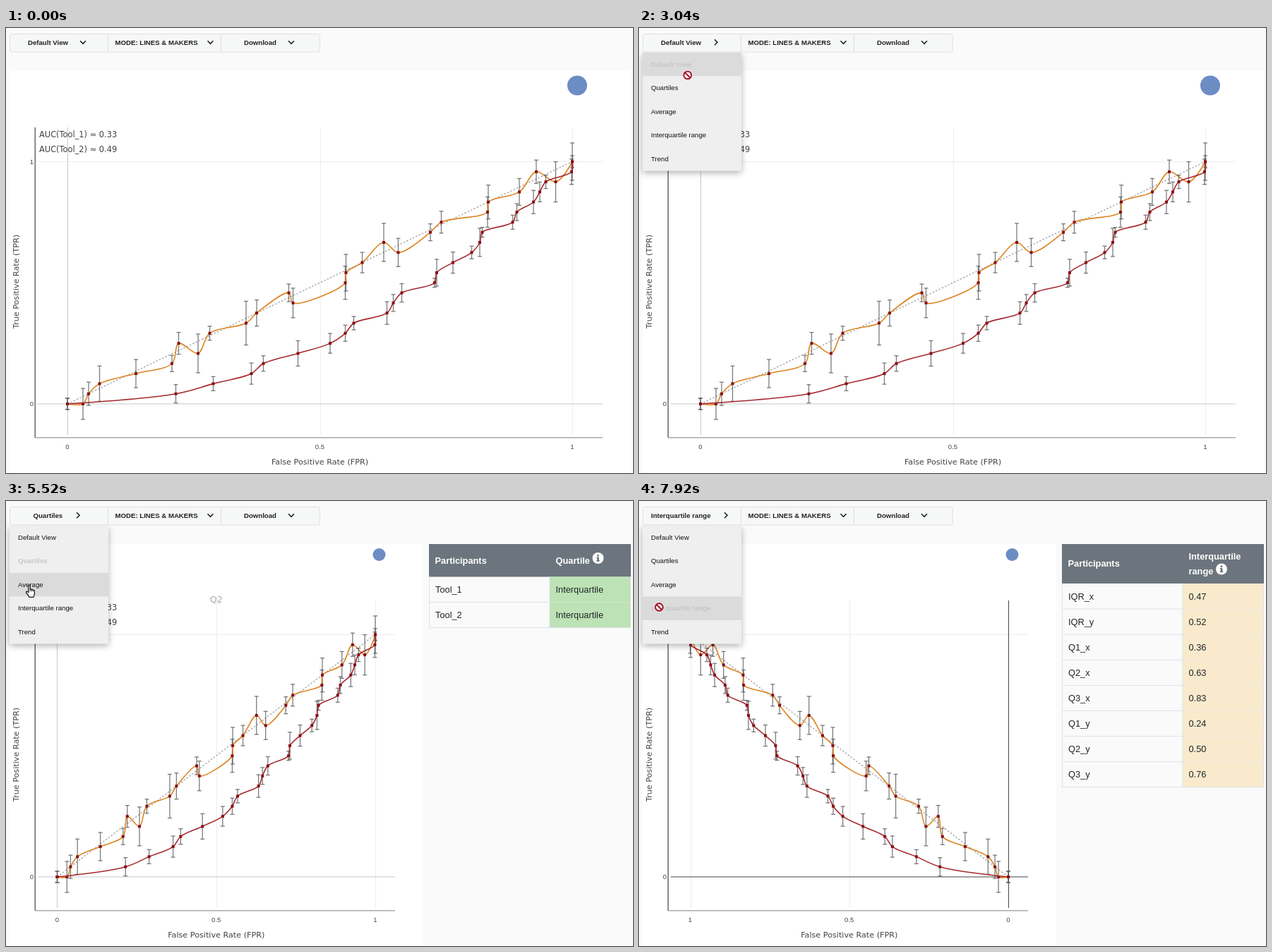
An HTML page with a canvas for the animation above (8 s loop, 888x631 px).

```html
<!DOCTYPE html>
<html lang="en">
<head>
<meta charset="utf-8">
<title>ROC benchmark view</title>
<style>
html, body { margin: 0; width: 100%; height: 100%; overflow: hidden; background: #fafafa; }
canvas { display: block; }
</style>
</head>
<body>
<canvas id="stage" width="888" height="631"></canvas>
<script>
const ctx = document.getElementById('stage').getContext('2d');
const LOOP = 8000;
const SANS = '"Liberation Sans", Arial, sans-serif';
const WIDE = '"DejaVu Sans", Verdana, sans-serif';

const TOP = 34.6, ROW = 33.6;
const VIEWS = ['Default View', 'Quartiles', 'Average', 'Interquartile range', 'Trend'];
const BUTTON = [[31, 109], [38.5, 102], [41, 99.5], [17, 123]]; // label x, chevron x
const PICKS = [4000, 5600, 7280];
const MENU_AT = 2400;

// x is measured on the wide chart (0 at 87, 1 at 802); levels are in 24ths
const ORANGE = {
  color: '#dc8420',
  x: [87, 109, 117, 132.5, 184, 235, 244.5, 272, 288.5, 340, 355, 400.5, 406.5, 480.5,
    481.5, 504.5, 535, 555.5, 601, 616.5, 682, 683, 727, 751, 778.5, 802],
  level: [0, 0, 1, 2, 3, 4, 6, 5, 7, 8, 9, 11, 10, 12, 13, 14, 16, 15, 17, 18, 19, 20, 21, 23, 22, 24],
  err: [8, 22, 16.5, 25, 20, 11.5, 15.5, 27.5, 10, 31, 18.5, 12.5, 21, 23.5, 26, 14.5, 27,
    20, 12, 15.5, 21.5, 24, 19, 16.5, 28.5, 26.5]
};
const RED = {
  color: '#a62a30',
  x: [87, 240.5, 293.5, 347.5, 364.5, 413.5, 459, 480.5, 492.5, 539.5, 548.5, 560.5, 607,
    610, 633, 659.5, 671, 674.5, 717.5, 723.5, 747, 756, 764.5, 801, 802],
  err: [8, 13, 10, 15, 11, 18, 14, 11.5, 9.5, 16, 12, 13, 6.5, 19, 15, 9, 20, 7, 10, 12,
    16.5, 14, 9.5, 18, 8.5]
};
RED.level = RED.x.map((_, i) => i);

// time, x, y of the pointer hotspot
const PATH = [[2000, 135, 33], [2300, 128.5, 22], [2640, 128.5, 22], [3280, 41.5, 87.5],
  [4640, 41.5, 87.5], [5040, 33, 119], [5540, 33, 119], [5800, 29.5, 129.5],
  [6760, 29.5, 129.5], [7080, 28.5, 150.5], [LOOP, 28.5, 150.5]];

const HAND = new Path2D('M4 11.5V1.9Q4 .6 5.2 .6T6.4 1.9V7Q7.6 5.9 8.6 7.4Q10 6.5 10.8 8' +
  'Q12.6 7.6 12.6 9.5V13Q12.4 15.5 11 18H5.2Q3.5 14.5 .8 11.6Q.3 9.6 2 9.8Q3 10.2 4 11.5Z');
const KNUCKLES = new Path2D('M6.4 7V10M8.6 7.4V10M10.8 8V10');

const clamp = v => Math.max(0, Math.min(1, v));
const ease = v => v * v * (3 - 2 * v);
const yOf = v => 533 - 343.5 * v;

function rect(x, y, w, h, fill) {
  ctx.fillStyle = fill;
  ctx.fillRect(x, y, w, h);
}

function line(x1, y1, x2, y2, color, width = 1) {
  ctx.strokeStyle = color;
  ctx.lineWidth = width;
  ctx.beginPath();
  ctx.moveTo(x1, y1);
  ctx.lineTo(x2, y2);
  ctx.stroke();
}

function disc(x, y, r, fill) {
  ctx.fillStyle = fill;
  ctx.beginPath();
  ctx.arc(x, y, r, 0, 2 * Math.PI);
  ctx.fill();
}

// y is the middle of the capitals
function text(str, x, y, size, { font = SANS, weight = '', color = '#444', align = 'left' } = {}) {
  ctx.font = `${weight} ${size}px ${font}`;
  ctx.fillStyle = color;
  ctx.textAlign = align;
  ctx.fillText(str, x, y + size * 0.36);
}

// centripetal Catmull-Rom handles before and after point b
function handles(a, b, c) {
  const d1 = [a[0] - b[0], a[1] - b[1]], d2 = [c[0] - b[0], c[1] - b[1]];
  const l1 = Math.sqrt(Math.hypot(...d1)), l2 = Math.sqrt(Math.hypot(...d2));
  const n = [0, 1].map(k => l2 * l2 * d1[k] - l1 * l1 * d2[k]);
  const m1 = 3 * l2 * (l1 + l2), m2 = 3 * l1 * (l1 + l2);
  return [n.map((v, k) => b[k] + v / m1), n.map((v, k) => b[k] - v / m2)];
}

function spline(pts, color) {
  const last = pts.length - 1;
  const h = pts.map((p, i) => i && i < last ? handles(pts[i - 1], p, pts[i + 1]) : null);
  ctx.beginPath();
  ctx.moveTo(...pts[0]);
  ctx.quadraticCurveTo(...h[1][0], ...pts[1]);
  for (let i = 2; i < last; i++) ctx.bezierCurveTo(...h[i - 1][1], ...h[i][0], ...pts[i]);
  ctx.quadraticCurveTo(...h[last - 1][1], ...pts[last]);
  ctx.strokeStyle = color;
  ctx.lineWidth = 1.6;
  ctx.stroke();
}

function series(s, xOf) {
  const pts = s.x.map((x, i) => [xOf((x - 87) / 715), yOf(s.level[i] / 24)]);
  pts.forEach(([x, y], i) => {
    const e = s.err[i], c = 'rgba(80,80,80,.75)';
    line(x, y - e, x, y + e, c, 1.3);
    line(x - 3, y - e, x + 3, y - e, c, 1.3);
    line(x - 3, y + e, x + 3, y + e, c, 1.3);
  });
  spline(pts, s.color);
  for (const [x, y] of pts) rect(x - 2, y - 2, 4, 4, '#8a1014');
}

function chart(view) {
  const wide = view === 0, flipped = view > 1;
  const right = wide ? 845 : 551;
  const x0 = wide ? 87 : 72.5, span = wide ? 715 : 450.5;
  const xOf = v => x0 + span * (flipped ? 1 - v : v);
  const mid = xOf(0.5), zero = flipped ? '#444' : '#c8c8c8';

  rect(5, 61, wide ? 880 : 586, 570, '#fff');
  if (wide) disc(809, 81.5, 14, '#6c8cc4');
  else disc(528.5, 76, 9, '#6c8cc4');

  for (const v of [0.5, 1]) line(Math.round(xOf(v)) + .5, 141, Math.round(xOf(v)) + .5, 577, '#eee');
  line(45, 189.5, right, 189.5, '#eee');
  line(Math.floor(xOf(0)) + .5, 141, Math.floor(xOf(0)) + .5, 577, zero);
  line(45, 533, right, 533, zero, 1.2);
  line(41.2, 141, 41.2, 581, '#444', 1.2);
  line(41, 580.8, right, 580.8, '#999', 1.2);

  ctx.setLineDash([2.4, 2.4]);
  line(xOf(0), yOf(0), xOf(1), yOf(1), '#aaa', 1.5);
  ctx.setLineDash([]);
  series(ORANGE, xOf);
  series(RED, xOf);

  for (const v of [0, 0.5, 1]) text(String(v), xOf(v), 593.5, 9.6, { align: 'center' });
  text('1', 39, 189.5, 9.6, { align: 'right' });
  text('0', 39, 533, 9.6, { align: 'right' });
  text('False Positive Rate (FPR)', mid, 615, 11.2, { font: WIDE, align: 'center' });
  ctx.save();
  ctx.translate(13.5, 359.5);
  ctx.rotate(-Math.PI / 2);
  text('True Positive Rate (TPR)', 0, 0, 11.2, { font: WIDE, align: 'center' });
  ctx.restore();
  if (!flipped) {
    text('AUC(Tool_1) ≈ 0.33', 47, 150.5, 11.4, { font: WIDE });
    text('AUC(Tool_2) ≈ 0.49', 47, 172, 11.4, { font: WIDE });
  }
  if (view === 1) text('Q2', mid, 139, 12.8, { font: WIDE, color: '#a4adb6', align: 'center' });
}

function table(view) {
  const tall = view === 3;
  const headEnd = tall ? 117 : 107.5;
  const rowH = view === 2 ? 55.5 : 36.1;
  const names = tall ? ['IQR_x', 'IQR_y', 'Q1_x', 'Q2_x', 'Q3_x', 'Q1_y', 'Q2_y', 'Q3_y'] : ['Tool_1', 'Tool_2'];
  const values = ['0.47', '0.52', '0.36', '0.63', '0.83', '0.24', '0.50', '0.76'];
  const head = [null, ['Quartile'], ['Average'], ['Interquartile', 'range']][view];
  const icon = [null, [838.5, 81], [840, 81], [825, 96.5]][view];
  const bold = { weight: 'bold', color: '#fff' }, body = { color: '#212529' };

  rect(599, 61, 286, headEnd - 61, '#6c757d');
  text('Participants', 607.5, tall ? 88.5 : 84, 12.8, bold);
  head.forEach((h, i) => text(h, 778.5, (tall ? 78 : 84.5) + i * 21.5, 12.8, bold));
  disc(...icon, 8, '#fff');
  rect(icon[0] - 1.2, icon[1] - 4.8, 2.4, 2.3, '#5c646c');
  rect(icon[0] - 1.2, icon[1] - 1.3, 2.4, 5.8, '#5c646c');
  rect(icon[0] - 2.2, icon[1] - 1.3, 2, 1.3, '#5c646c');
  rect(icon[0] - 2.2, icon[1] + 3.2, 4.4, 1.3, '#5c646c');

  names.forEach((name, i) => {
    const y = headEnd + i * rowH, c = y + rowH / 2;
    rect(770, y, 115, rowH, view === 1 ? '#bde2b5' : '#f9eacd');
    text(name, 608, c, 12.8, body);
    if (view === 2) {
      text('Medium', 778.5, c - 9.8, 12.8, body);
      text('performance', 778.5, c + 9.5, 12.8, body);
    } else {
      text(tall ? values[i] : 'Interquartile', 778.5, c, 12.8, body);
    }
    line(599, y + rowH, 885, y + rowH, '#dee2e6');
  });
  const end = headEnd + rowH * names.length;
  for (const x of [599.5, 770, 884.5]) line(x, headEnd, x, end, '#dee2e6');
}

function chevron(x, turn) {
  ctx.save();
  ctx.translate(x, 20.3);
  ctx.rotate(-turn * Math.PI / 2);
  ctx.strokeStyle = '#222';
  ctx.lineWidth = 1.6;
  ctx.beginPath();
  ctx.moveTo(-4, -2);
  ctx.lineTo(0, 2);
  ctx.lineTo(4, -2);
  ctx.stroke();
  ctx.restore();
}

function toolbar(view, turn) {
  ctx.beginPath();
  ctx.roundRect(5.5, 8.5, 439, 25.5, 3);
  ctx.fillStyle = '#f6f7f7';
  ctx.fill();
  ctx.strokeStyle = '#dfe1e4';
  ctx.lineWidth = 1;
  ctx.stroke();
  line(144.5, 9, 144.5, 34, '#dcdee8');
  line(304.5, 9, 304.5, 34, '#dcdee8');
  const [labelX, chevX] = BUTTON[view];
  const style = { weight: 'bold', color: '#222' };
  text(VIEWS[view], labelX, 20.5, 9.65, style);
  text('MODE: LINES & MAKERS', 154.5, 20.5, 9.65, style);
  text('Download', 337, 20.5, 9.65, style);
  chevron(chevX, turn);
  chevron(289.5, 0);
  chevron(404, 0);
}

function menu(view, hover, open) {
  ctx.save();
  ctx.globalAlpha = open;
  ctx.save();
  ctx.shadowColor = 'rgba(0,0,0,.3)';
  ctx.shadowBlur = 9;
  ctx.shadowOffsetY = 3;
  rect(5, TOP, 140, ROW * 5, '#efefef');
  ctx.restore();
  if (hover >= 0) rect(5, TOP + hover * ROW, 140, ROW, '#dbdbdb');
  VIEWS.forEach((name, i) => {
    const off = i === view;
    text(name, 17, TOP + (i + .5) * ROW - .3, 9.65, { weight: off ? 'bold' : '', color: off ? '#c6c6c6' : '#111' });
  });
  ctx.restore();
}

function pointerAt(t) {
  if (t < PATH[0][0]) return null;
  const i = PATH.findIndex(p => p[0] > t);
  const [t0, x0, y0] = PATH[i - 1], [t1, x1, y1] = PATH[i];
  const k = ease((t - t0) / (t1 - t0));
  return [x0 + (x1 - x0) * k, y0 + (y1 - y0) * k];
}

function pointer([x, y], blocked) {
  if (blocked) {
    disc(x, y, 7, '#fff');
    ctx.strokeStyle = '#a3172a';
    ctx.lineWidth = 2.1;
    ctx.beginPath();
    ctx.arc(x, y, 5.4, 0, 2 * Math.PI);
    ctx.stroke();
    line(x - 3.8, y - 3.8, x + 3.8, y + 3.8, '#a3172a', 2.1);
    return;
  }
  ctx.save();
  ctx.translate(x - 5.2, y - .6);
  ctx.fillStyle = '#fff';
  ctx.strokeStyle = '#111';
  ctx.lineWidth = 1.2;
  ctx.lineJoin = 'round';
  ctx.fill(HAND);
  ctx.stroke(HAND);
  ctx.lineWidth = .9;
  ctx.stroke(KNUCKLES);
  ctx.restore();
}

function draw(t) {
  const view = PICKS.filter(p => t >= p).length;
  const open = clamp((t - MENU_AT) / 120);
  const turn = ease(clamp((t - 2580) / 200));
  const at = pointerAt(t);
  const hover = at && open && at[1] >= TOP ? Math.floor((at[1] - TOP) / ROW) : -1;

  rect(0, 0, 888, 631, '#fafafa');
  chart(view);
  if (view) table(view);
  if (open) menu(view, hover, open);
  toolbar(view, turn);
  if (at) pointer(at, hover === view);
}

function frame() {
  draw(performance.now() % LOOP);
  requestAnimationFrame(frame);
}
frame();
</script>
</body>
</html>
```
